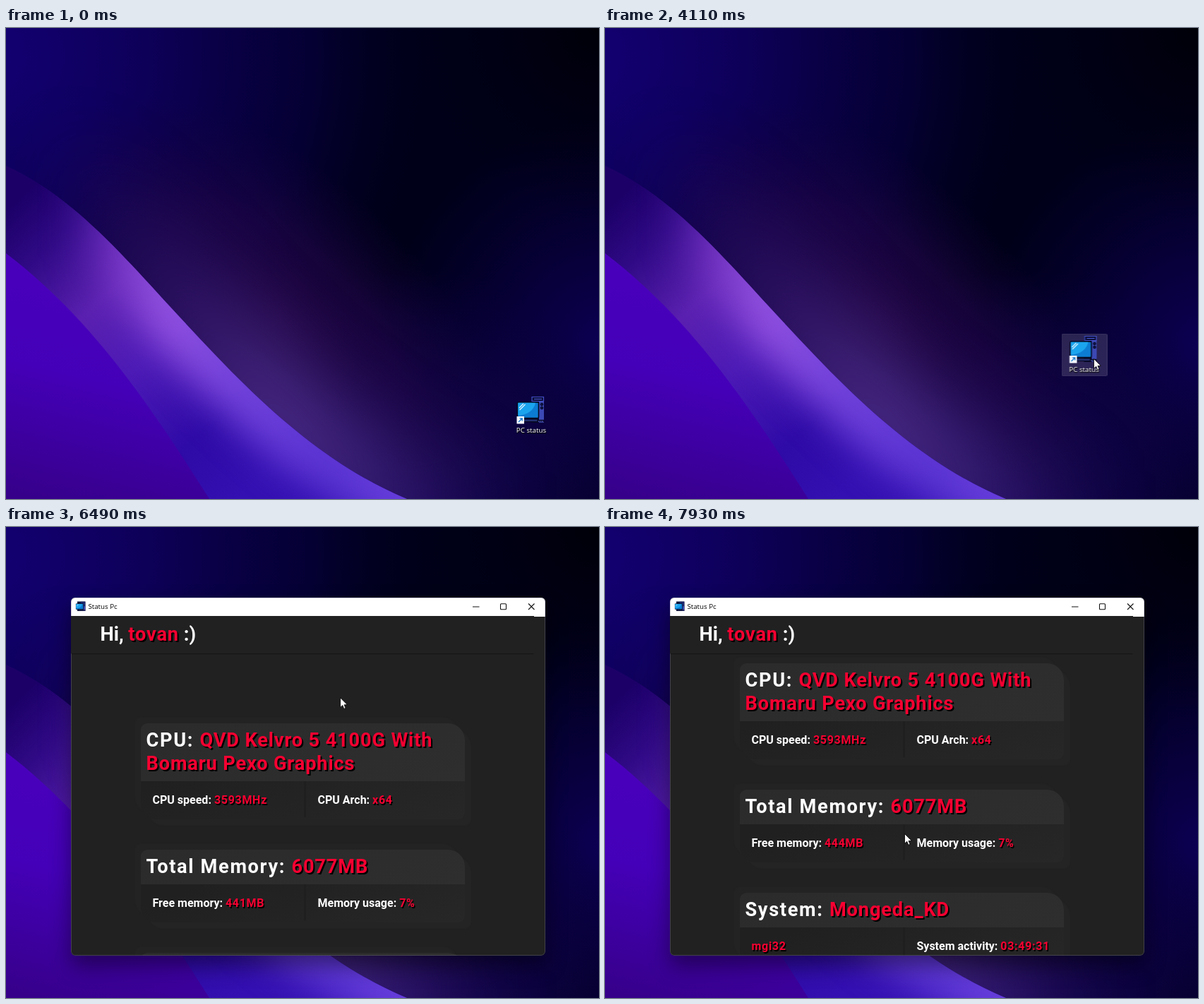
These frames come from a looping animation (840 px wide and 667 px high, 8000 ms). An HTML page:

```html
<!DOCTYPE html>
<html lang="en">
<head>
<meta charset="utf-8">
<title>Desktop</title>
<style>
html, body { margin: 0; width: 100%; height: 100%; overflow: hidden; background: #000014; }
#stage { position: absolute; inset: 0; overflow: hidden; font-family: "Open Sans", "Noto Sans", sans-serif; }
#stage, #stage * { box-sizing: border-box; }
.wall { position: absolute; left: 0; top: 0; }

/* Every animation shares one 8 s clock. */
.icon, .hover, .ghost, .cursor, .win, .blank, .title, .row, .text, .scroll, .old, .new {
  animation: 8s linear infinite both;
}

/* Desktop shortcut */
.icon { position: absolute; left: 712px; top: 519px; width: 65px; height: 60px; }
.icon svg { position: absolute; left: 11px; top: 2px; }
.icon span {
  position: absolute; left: 0; width: 64px; top: 44px; text-align: center; white-space: nowrap;
  font-size: 9.8px; line-height: 14px; color: #fff; text-shadow: 0 1px 1px #000, 1px 1px 2px #000;
}
.hover {
  position: absolute; inset: 0; border-radius: 2px;
  background: rgba(255,255,255,.14); border: 1px solid rgba(255,255,255,.05);
  animation-name: hover;
}
.real { animation-name: drop; animation-timing-function: step-end; }
.ghost { animation-name: drag; }
.cursor { position: absolute; left: 0; top: 0; overflow: visible; animation-name: point; animation-timing-function: ease-in-out; }

@keyframes drop { 0% { transform: none; } 48.1%, 100% { transform: translate(-65.5px, -86px); } }
@keyframes hover {
  0%, 18.7% { opacity: 0; } 18.71%, 20.2% { opacity: 1; } 20.21%, 25.9% { opacity: 0; }
  25.91%, 28.4% { opacity: 1; } 28.41%, 48% { opacity: 0; }
  48.1%, 67.3% { opacity: 1; } 67.35%, 100% { opacity: 0; }
}
@keyframes drag {
  0%, 28.4% { opacity: 0; transform: none; animation-timing-function: linear; }
  28.5% { opacity: .75; transform: none; animation-timing-function: ease-in-out; }
  37%, 39.5% { opacity: .75; transform: translate(-46px, -50px); animation-timing-function: ease-in-out; }
  46.5%, 48.1% { opacity: .75; transform: translate(-55px, -75px); }
  48.11%, 100% { opacity: 0; transform: translate(-55px, -75px); }
}
@keyframes point {
  0%, 17.95% { transform: translate(860px, 590px); }
  18% { transform: translate(832px, 580px); }
  21.5% { transform: translate(666px, 540px); }
  24% { transform: translate(700px, 508px); }
  27.6%, 28.5% { transform: translate(749px, 545px); }
  37%, 39.5% { transform: translate(703px, 495px); }
  46.5%, 51.3% { transform: translate(694px, 470px); }
  51.37%, 53.2% { transform: translate(692px, 468px); }
  55.6%, 57.3% { transform: translate(682px, 457px); }
  61.6%, 68.2% { transform: translate(695px, 475px); }
  72.3%, 77.5% { transform: translate(493px, 208px); }
  87.4% { transform: translate(422px, 326px); }
  88.2%, 91.5% { transform: translate(422px, 328px); }
  99.1%, 100% { transform: translate(424px, 434px); }
}

/* Window */
.win {
  position: absolute; left: 91.5px; top: 99.5px; width: 672px; height: 507px;
  border-radius: 6px; overflow: hidden; background: #212121;
  animation-name: open;
}
.win::after { content: ""; position: absolute; inset: 0; border: 1px solid rgba(130,130,150,.35); border-radius: 6px; }
.shadow { background: none; overflow: visible; box-shadow: 0 14px 30px rgba(0,0,0,.45); }
.shadow::after { display: none; }
@keyframes open {
  0%, 67.34% { opacity: 0; transform: translate(-6px, -3px) scale(.899); }
  67.37%, 68.2% { opacity: .4; transform: translate(-6px, -3px) scale(.899); }
  69.2% { opacity: .92; transform: translate(-1.5px, -1px) scale(.975); }
  70.2%, 100% { opacity: 1; transform: none; }
}
.blank { position: absolute; inset: 26px 0 0; background: #000; animation-name: blank; }
@keyframes blank { 0%, 70% { opacity: 1; } 70.9%, 100% { opacity: 0; } }
.bar { position: absolute; left: 0; top: 0; width: 100%; height: 26.5px; background: #fff; color: #000; font-size: 9.7px; line-height: 26px; }
.bar span { position: absolute; left: 24.5px; }
.bar svg { position: absolute; left: 0; top: 0; }

.page { position: absolute; inset: 26px 0 0; font: 700 16px Roboto, Arial, sans-serif; color: #fff; }
.head {
  position: absolute; left: 0; top: 0; width: 656px; height: 53px; padding-left: 41.5px; z-index: 1;
  background: #212121; box-shadow: 0 2px 1px -1px #161616; font-size: 27.2px; line-height: 52px;
}
.view { position: absolute; inset: 52px 0 0; overflow: hidden; }
.scroll { position: absolute; left: 98.5px; top: 99.5px; width: 459px; animation-name: scroll; }
@keyframes scroll {
  0%, 90.6% { transform: none; }
  90.75%, 91.5% { transform: translateY(-69px); animation-timing-function: ease-out; }
  93.6%, 95.6% { transform: translateY(-141px); animation-timing-function: ease-in-out; }
  99.1%, 100% { transform: translateY(-85px); }
}
.card {
  margin-bottom: 43px; border-radius: 9px 24px 9px 24px; white-space: nowrap;
  background: linear-gradient(160deg, #202020 30%, #272727);
  box-shadow: 9px 9px 1px #242424, -9px -9px 1px #232323;
}
.title {
  --h: 49px; height: var(--h); padding: 8px; border-radius: 9px 24px 0 0; overflow: hidden;
  background: linear-gradient(160deg, #2b2b2b, #2e2e2e); font-size: 27.2px; line-height: 33px; letter-spacing: 1.65px;
  animation-name: title;
}
.tall { --h: 82px; }
.row { position: relative; height: 54px; line-height: 54px; overflow: hidden; animation-name: row; }
.row::before { content: ""; position: absolute; left: 231px; top: 0; bottom: 3px; width: 3px; background: #1f1f1f; }
.row p { position: absolute; margin: 0; left: 17px; top: 0; }
.row p + p { left: 251px; }
@keyframes title { 0%, 77.6% { height: 42.5px; } 77.61%, 100% { height: var(--h); } }
@keyframes row { 0%, 77.6% { height: 34.5px; } 77.61%, 100% { height: 54px; } }
.text { animation-name: text; }
@keyframes text { 0%, 77.6% { opacity: 0; } 77.61%, 100% { opacity: 1; } }
em { font-style: normal; color: #f70031; letter-spacing: .7px; text-shadow: 1.5px 1.5px 0 #000; }
.title em, .head em { letter-spacing: .85px; text-shadow: 2px 2px 0 #000; }

/* Readings that tick once */
.num { position: relative; }
.new { position: absolute; left: 0; top: 0; line-height: normal; animation-name: appear; }
.old { animation-name: vanish; }
@keyframes appear { 0%, 95% { opacity: 0; } 95.01%, 100% { opacity: 1; } }
@keyframes vanish { 0%, 95% { opacity: 1; } 95.01%, 100% { opacity: 0; } }
</style>
</head>
<body>
<div id="stage">
  <svg class="wall" width="840" height="667" viewBox="0 0 840 667">
    <defs>
      <radialGradient id="sky" gradientUnits="userSpaceOnUse" cx="-30" cy="40" r="660">
        <stop offset="0" stop-color="#130074"/><stop offset=".35" stop-color="#0d0058"/>
        <stop offset=".7" stop-color="#06003a" stop-opacity=".8"/><stop offset="1" stop-color="#000018" stop-opacity="0"/>
      </radialGradient>
      <radialGradient id="east" gradientUnits="userSpaceOnUse" cx="850" cy="450" r="320">
        <stop offset="0" stop-color="#0c0054"/><stop offset=".4" stop-color="#0a0048" stop-opacity=".7"/>
        <stop offset="1" stop-color="#080040" stop-opacity="0"/>
      </radialGradient>
      <radialGradient id="south" gradientUnits="userSpaceOnUse" cx="580" cy="670" r="330">
        <stop offset="0" stop-color="#1a0858"/><stop offset=".5" stop-color="#100448" stop-opacity=".75"/>
        <stop offset="1" stop-color="#0a0040" stop-opacity="0"/>
      </radialGradient>
      <radialGradient id="night" gradientUnits="userSpaceOnUse" cx="840" cy="0" r="260">
        <stop offset="0" stop-color="#000008"/><stop offset="1" stop-color="#000014" stop-opacity="0"/>
      </radialGradient>
      <radialGradient id="plum">
        <stop offset="0" stop-color="#28084e" stop-opacity=".85"/><stop offset=".5" stop-color="#22064a" stop-opacity=".6"/>
        <stop offset="1" stop-color="#180440" stop-opacity="0"/>
      </radialGradient>
      <linearGradient id="haze" gradientUnits="userSpaceOnUse" x1="60" y1="0" x2="700" y2="0">
        <stop offset="0" stop-color="#24085a" stop-opacity="0"/><stop offset=".28" stop-color="#301468" stop-opacity=".8"/>
        <stop offset=".5" stop-color="#4a2a86"/><stop offset=".72" stop-color="#3a2078" stop-opacity=".9"/>
        <stop offset="1" stop-color="#180850" stop-opacity="0"/>
      </linearGradient>
      <linearGradient id="band" gradientUnits="userSpaceOnUse" x1="0" y1="260" x2="360" y2="640">
        <stop offset="0" stop-color="#1c0068"/><stop offset=".15" stop-color="#300a86"/>
        <stop offset=".35" stop-color="#5a20b0"/><stop offset=".55" stop-color="#4c1ab6"/>
        <stop offset=".8" stop-color="#2e0aa6"/><stop offset="1" stop-color="#3410b2"/>
      </linearGradient>
      <linearGradient id="shine" gradientUnits="userSpaceOnUse" x1="90" y1="0" x2="580" y2="0">
        <stop offset="0" stop-color="#5a20b0" stop-opacity="0"/><stop offset=".12" stop-color="#7434c2" stop-opacity=".8"/>
        <stop offset=".27" stop-color="#9452e0"/><stop offset=".48" stop-color="#7444dc"/>
        <stop offset=".75" stop-color="#5a34d2"/><stop offset="1" stop-color="#6840dc"/>
      </linearGradient>
      <linearGradient id="hill" x1=".2" y1="0" x2="0" y2="1">
        <stop offset="0" stop-color="#4a00bc"/><stop offset=".45" stop-color="#4400b8"/><stop offset="1" stop-color="#360088"/>
      </linearGradient>
      <filter id="far" filterUnits="userSpaceOnUse" x="-200" y="-200" width="1300" height="1200" color-interpolation-filters="sRGB"><feGaussianBlur stdDeviation="46"/></filter>
      <filter id="near" filterUnits="userSpaceOnUse" x="-200" y="-200" width="1300" height="1200" color-interpolation-filters="sRGB"><feGaussianBlur stdDeviation="25"/></filter>
      <path id="crest" d="M0 195C95 238 167 324 242 405C332 502 433 611 568 667L760 740"/>
      <clipPath id="ribbon"><path d="M0 195C95 238 167 324 242 405C332 502 433 611 568 667H0Z"/></clipPath>

      <symbol id="pc" viewBox="0 0 40 40">
        <path d="M21 1H39V38H21Z" fill="#070a2c"/>
        <path d="M32 8H39V38H32Z" fill="#3c49b4"/>
        <path d="M22 1.5H38.5V7.5H22Z" fill="#0b0e38" stroke="#4450c8" stroke-width="1.2"/>
        <path d="M25 4.5H36" stroke="#4d5bd8" stroke-width="1"/>
        <g fill="#11164e" stroke="#05071e" stroke-width="1"><circle cx="36" cy="12" r="1.8"/><circle cx="36" cy="17" r="1.8"/></g>
        <path d="M25 35.5H39" stroke="#05071e" stroke-width="3.4"/>
        <path d="M26 36H39" stroke="#5967d8" stroke-width="1.6" stroke-dasharray="1.6 1"/>
        <path d="M10 33H30V36.5H10Z" fill="#23306e" stroke="#05071e"/>
        <rect x="1.5" y="9" width="30" height="22.5" rx="1.5" fill="#0c7cd2" stroke="#04081e" stroke-width="1.6"/>
        <path d="M2.3 9.8H27C25 20 16 27 2.3 28Z" fill="#1ba4ee"/>
        <path d="M4 17L10 11M4.5 20L12.5 12" stroke="#e8f8ff" stroke-width="1.1"/>
      </symbol>
      <symbol id="link" viewBox="0 0 40 40">
        <use href="#pc"/>
        <rect x=".5" y="29" width="10.5" height="10.5" fill="#f4f8ff"/>
        <path d="M3 37L8 32M4.6 31.8H8.2V35.4" fill="none" stroke="#1676c8" stroke-width="1.3"/>
      </symbol>
    </defs>
    <rect width="840" height="667" fill="#000018"/>
    <rect width="840" height="667" fill="url(#sky)"/>
    <rect width="840" height="667" fill="url(#east)"/>
    <rect width="840" height="667" fill="url(#south)"/>
    <rect width="840" height="667" fill="url(#night)"/>
    <ellipse cx="390" cy="410" rx="400" ry="200" transform="rotate(44 390 410)" fill="url(#plum)"/>
    <use href="#crest" fill="none" stroke="url(#haze)" stroke-width="150" filter="url(#far)"/>
    <g clip-path="url(#ribbon)">
      <rect width="840" height="667" fill="url(#band)"/>
      <use href="#crest" fill="none" stroke="url(#shine)" stroke-width="98" filter="url(#near)"/>
    </g>
    <path d="M0 319C110 403 190 511 288 667H0Z" fill="url(#hill)"/>
  </svg>

  <div class="icon real">
    <div class="hover"></div>
    <svg width="40" height="40"><use href="#link" width="40" height="40"/></svg>
    <span>PC status</span>
  </div>
  <div class="icon ghost">
    <svg width="40" height="40"><use href="#link" width="40" height="40"/></svg>
    <span>PC status</span>
  </div>

  <div class="win shadow"></div>
  <div class="win">
    <div class="page">
      <div class="head"><div class="text">Hi, <em>tovan</em> :)</div></div>
      <div class="view"><div class="scroll">
        <div class="card">
          <div class="title tall"><div class="text">CPU: <em>QVD Kelvro 5 4100G With<br>Bomaru Pexo Graphics</em></div></div>
          <div class="row"><div class="text">
            <p>CPU speed: <em>3593MHz</em></p><p>CPU Arch: <em>x64</em></p>
          </div></div>
        </div>
        <div class="card">
          <div class="title"><div class="text">Total Memory: <em>6077MB</em></div></div>
          <div class="row"><div class="text">
            <p>Free memory: <em class="num"><span class="old">441MB</span><span class="new">444MB</span></em></p>
            <p>Memory usage: <em>7%</em></p>
          </div></div>
        </div>
        <div class="card">
          <div class="title"><div class="text">System: <em>Mongeda_KD</em></div></div>
          <div class="row"><div class="text">
            <p><em>mgi32</em></p>
            <p>System activity: <em class="num"><span class="old">03:49:30</span><span class="new">03:49:31</span></em></p>
          </div></div>
        </div>
      </div></div>
    </div>
    <div class="blank"></div>
    <div class="bar">
      <svg width="672" height="26" fill="none" stroke="#111" stroke-width="1.1">
        <rect x="9" y="5.5" width="11.5" height="13.5" fill="#0a1036" stroke="none"/>
        <use href="#pc" x="6.5" y="5.5" width="14" height="14" stroke="none"/>
        <path d="M569 13H578.5M648 8.5L656.5 17M656.5 8.5L648 17"/>
        <rect x="608.5" y="8.8" width="8" height="8" rx="1"/>
      </svg>
      <span>Status Pc</span>
    </div>
  </div>

  <svg class="cursor" width="12" height="18">
    <path d="M.5 .5V14.2L3.7 11.3 5.8 16.3 8.1 15.3 6 10.5H10.4Z" fill="#fff" stroke="#000" stroke-width=".8"/>
  </svg>
</div>
</body>
</html>
```
